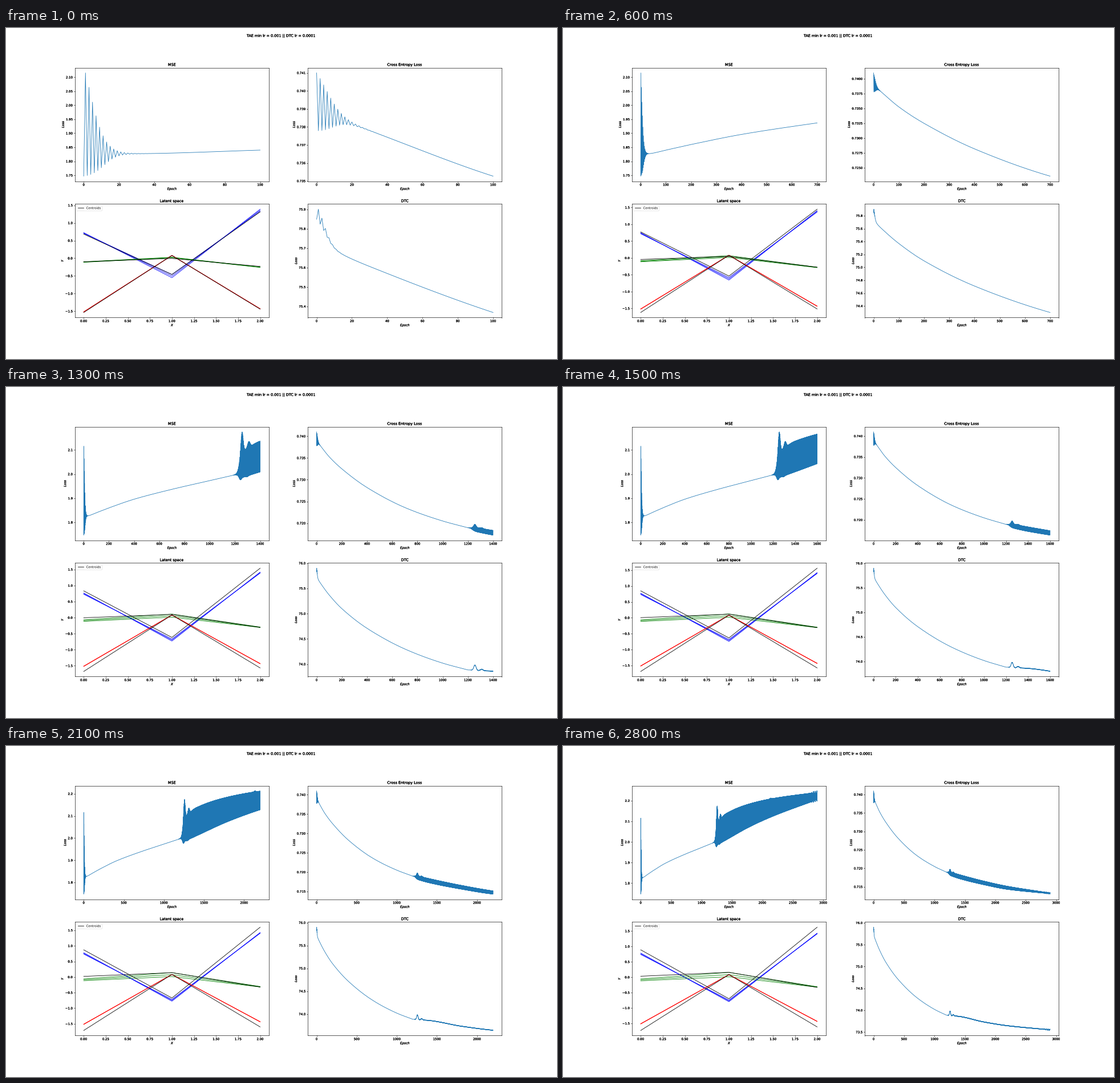
Animation, 966 px wide and 580 px high, one loop 2900 ms. Source, as a matplotlib script:

```python
import matplotlib.pyplot as plt
import numpy as np
from matplotlib.animation import FuncAnimation
from matplotlib.patheffects import Normal

W, H, DPI = 966, 580, 38.65
FRAMES, STEP = 29, 100

plt.rcParams.update({"font.family": "DejaVu Sans", "axes.linewidth": 1.2,
                     "xtick.major.width": 1.2, "ytick.major.width": 1.2})
HEAVY = [Normal()] * 3

epochs = np.arange(FRAMES * STEP + 1)
odd = epochs % 2 == 1
EARLY = (0, 30, 100, 200, 400, 700, 1000, 1200)
LATE = (1250, 1400, 1800, 2200, 2900)


def curve(kx, ky):
    """Monotone cubic over all epochs, flat outside the knots."""
    kx, ky = np.array(kx, float), np.array(ky)
    h = np.diff(kx)
    d = np.diff(ky) / h
    a, b = d[:-1], d[1:]
    same = a * b > 0
    inner = np.where(same, 2 * a * b / np.where(same, a + b, 1), 0)
    m = np.concatenate([d[:1], inner, d[-1:]])
    i = np.clip(np.searchsorted(kx, epochs, "right") - 1, 0, len(h) - 1)
    t = np.clip((epochs - kx[i]) / h[i], 0, 1)
    return ((1 + 2 * t) * (1 - t) ** 2 * ky[i] + t * t * (3 - 2 * t) * ky[i + 1]
            + h[i] * t * (1 - t) * ((1 - t) * m[i] - t * m[i + 1]))


def fade(size, center, width):
    """Logistic decay, used for the ringing of the first epochs."""
    x = np.clip((epochs - center) / width, -50, 50)
    return size / (1 + np.exp(x))


def bump(center, width):
    return np.exp(-((epochs - center) / width) ** 2)


def spike(lead=0):
    return bump(1256 - lead, 13) + .27 * bump(1310 - lead, 14)


opened = fade(1, 1235, -9)
ripple = (np.interp(epochs, [2790, 2840], [0, 1])
          * np.cos(2 * np.pi * (epochs - 2840) / 28))


def trend(early, late):
    """Smooth early course handing over to the late one."""
    return curve(EARLY, early) * (1 - opened) + curve(LATE, late) * opened


mse_base = (1.8265, 1.8272, 1.840, 1.860, 1.896, 1.937, 1.973, 1.997)
mse_high = (trend(mse_base, (2.091, 2.137, 2.186, 2.2125, 2.241))
            + fade(.4484, 3.5, 4.2) + .09 * spike() + .004 * bump(2135, 14)
            + .007 * ripple)
mse_low = (trend(mse_base, (1.984, 2.009, 2.075, 2.128, 2.205))
           - fade(.083, 11.5, 3.7) - .012 * spike(14) - .006 * ripple)
mse = np.where(odd, mse_high, mse_low)

ce_base = (.7389, .7378, .73527, .7325, .7282, .7236, .7205, .71895)
ce_high = (trend(ce_base, (.7191, .71835, .7166, .71515, .71335))
           + fade(.00275, 5.4, 4.6) + .0007 * spike() + .00012 * ripple)
ce_low = (trend(ce_base, (.7181, .71724, .7156, .7143, .7131))
          - fade(.00126, 8.5, 4.3) - .0001 * ripple)
entropy = np.where(odd, ce_low, ce_high)

dtc_base = (75.723, 75.606, 75.369, 75.10, 74.71, 74.30, 74.02, 73.885)
dtc = (trend(dtc_base, (73.877, 73.86, 73.735, 73.646, 73.552))
       + fade(.1905, 4.4, 2.6) + .105 * spike() + .012 * ripple
       + np.where(odd, 1, -1) * (fade(.042, 3.5, 2.2) + .005 * opened))

# Bundles of three: colour, first pose, first spread, last pose, last spread
bundles = [
    ("blue", (.715, -.505, 1.36), (.01, -.045, .03),
     (.762, -.77, 1.42), (.022, -.026, .01)),
    ("green", (-.107, .022, -.255), (.007, .007, .005),
     (-.086, .085, -.317), (.031, .07, .008)),
    ("red", (-1.52, .08, -1.432), (.004, 0, .004),
     (-1.515, .083, -1.435), (.004, 0, .004)),
]
# Centroids: first pose, last pose
centroids = [
    ((.685, -.46, 1.315), (.89, -.70, 1.625)),
    ((-.10, -.005, -.23), (.032, .16, -.33)),
    ((-1.535, .08, -1.44), (-1.73, .085, -1.615)),
]
poses = []
for color, first, spread, last, last_spread in bundles:
    for k in (1, 0, -1):
        poses.append((color, np.array(first) + k * np.array(spread),
                      np.array(last) + k * np.array(last_spread)))
poses += [("black", np.array(a), np.array(b)) for a, b in centroids]


def drift(frame, color):
    """Share of the way covered by each of the three points."""
    t = frame / (FRAMES - 1)
    ends = (1 - np.exp(-2.3 * t)) / (1 - np.exp(-2.3))
    middle = ends if color == "blue" else ends ** 1.35
    return np.array([ends, middle, ends])


fig, axes = plt.subplots(2, 2, figsize=(W / DPI, H / DPI), dpi=DPI)
fig.subplots_adjust(left=.125, right=.9, top=.88, bottom=.125,
                    wspace=.2, hspace=.2)
fig.suptitle("TAE min lr = 0.001 || DTC lr = 0.0001", path_effects=HEAVY)


def label(ax, title, xlabel, ylabel):
    ax.set_title(title, path_effects=HEAVY)
    ax.set_xlabel(xlabel, style="italic", path_effects=HEAVY)
    ax.set_ylabel(ylabel, style="italic", path_effects=HEAVY)


losses = []
for ax, title, data in ((axes[0, 0], "MSE", mse),
                        (axes[0, 1], "Cross Entropy Loss", entropy),
                        (axes[1, 1], "DTC", dtc)):
    label(ax, title, "Epoch", "Loss")
    losses.append((ax.plot([], [], color="#1f77b4")[0], data))

space = axes[1, 0]
label(space, "Latent space", "X", "Y")
strands = [space.plot([0, 1, 2], first, color=color)[0]
           for color, first, _ in poses]
legend = space.legend(strands[-1:], ["Centroids"], loc="upper left")
legend.get_texts()[0].set_path_effects([Normal()])


def draw(frame):
    n = (frame + 1) * STEP
    for line, data in losses:
        line.set_data(epochs[:n + 1], data[:n + 1])
    for line, (color, first, last) in zip(strands, poses):
        line.set_ydata(first + (last - first) * drift(frame, color))
    for ax in axes.flat:
        ax.relim()
        ax.autoscale_view()
        for text in ax.get_xticklabels() + ax.get_yticklabels():
            text.set_path_effects(HEAVY)
    return []


anim = FuncAnimation(fig, draw, frames=FRAMES, interval=100,
                     init_func=lambda: [], repeat=True, repeat_delay=0)
plt.show()
```
